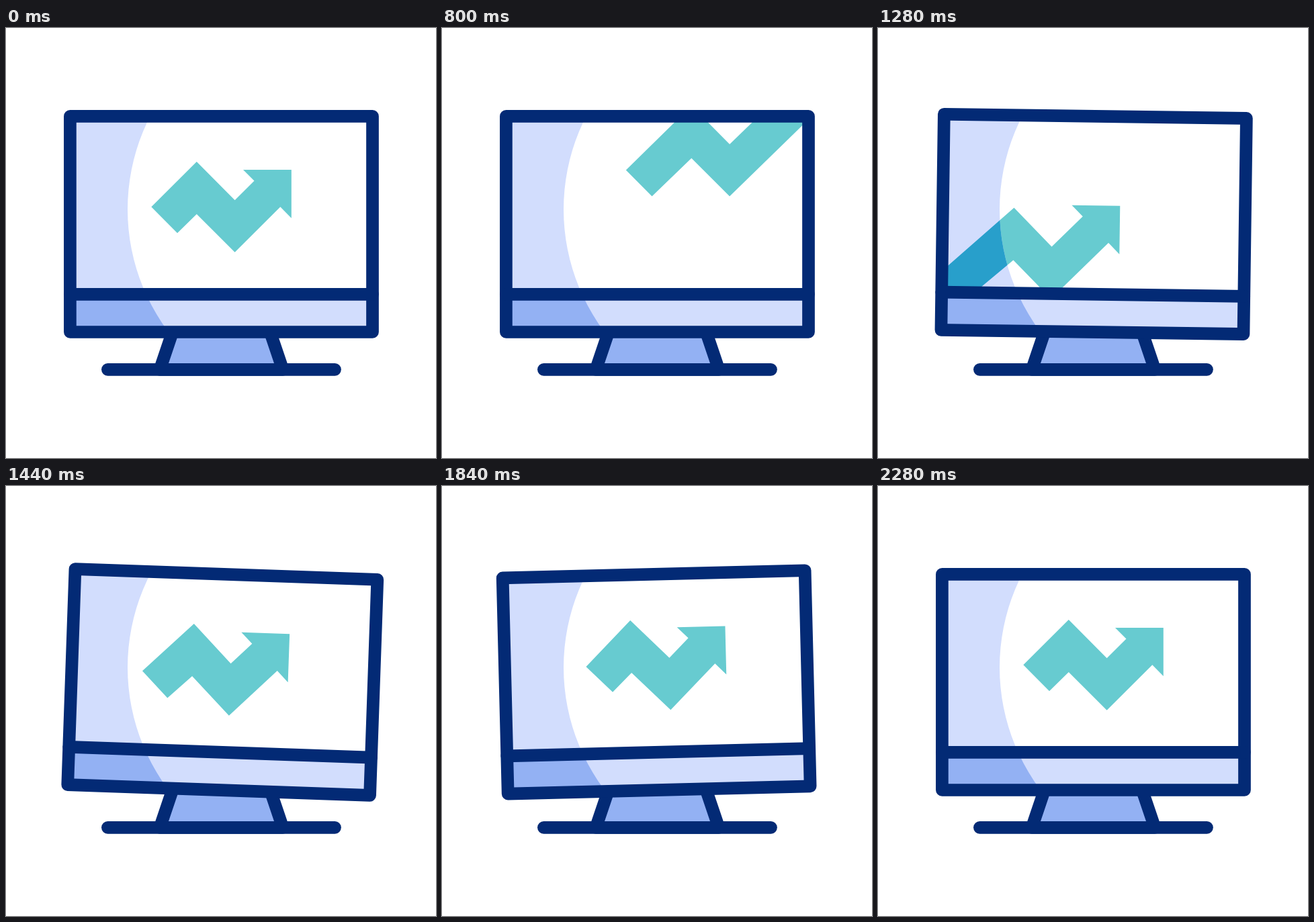
Animation of 640 by 640 pixels, one loop 2480 ms. Source, as an HTML page with a canvas:

```html
<!DOCTYPE html>
<html lang="en">
<head>
<meta charset="utf-8">
<title>Growth monitor</title>
<style>
  html, body { margin: 0; width: 100%; height: 100%; overflow: hidden; background: #fff; }
  canvas { display: block; width: 100vw; height: 100vh; }
</style>
</head>
<body>
<canvas id="stage" width="640" height="640"></canvas>
<script>
const ctx = document.getElementById('stage').getContext('2d');
const NAVY = '#032a75', LIGHT = '#d2ddfd', MID = '#93b1f3', TEAL = '#67cbd0', BLUE = '#289fcb';
const LOOP = 2480, STEP = 40, LAST = 2280;
const PIVOT = [320, 344], LINE = 18.7;
const WRAP = 960; // the arrow has left at the top and comes back from below

const clamp = v => Math.min(1, Math.max(0, v));
const ease = p => p * p * (3 - 2 * p);
const between = (t, a, b) => clamp((t - a) / (b - a));

// Screen swing: [time, degrees]
const SWING = [[1160, 0], [1440, 2], [1720, -3], [2000, 1], [2280, 0]];

function swing(t) {
  for (let i = 1; i < SWING.length; i++) {
    const [t0, a] = SWING[i - 1], [t1, b] = SWING[i];
    if (t < t1) return (a + (b - a) * ease(between(t, t0, t1))) * Math.PI / 180;
  }
  return 0;
}

// Offsets of the arrow's three parts: the head leads, the tail lags
function offsets(t) {
  if (t < WRAP) {
    const pull = -17 * ease(between(t, 0, 280));
    const head = pull + 225 * ease(between(t, 280, 1040));
    const push = Math.max(0, (t - 440) / 360) ** 3;
    const up = d => [d, -d * 0.952];
    return { head: up(head), body: up(87.5 * push), tail: up(57.5 * push) };
  }
  const rest = 1 - ease(between(t, 840, 1508));
  const from = (x, y) => [-x * rest, y * rest];
  return { head: from(243, 197), body: from(305, 260), tail: from(541, 449) };
}

function arrow(t) {
  const { head, body, tail } = offsets(t);
  const move = (o, pts) => pts.map(([x, y]) => [x + o[0], y + o[1]]);
  return [
    ...move(tail, [[216.3, 266.3]]),
    ...move(body, [[283.8, 199], [340.6, 256.2]]),
    ...move(head, [[369.5, 227.5], [353, 211], [424.8, 211], [424.8, 283], [408.3, 266.3]]),
    ...move(body, [[340.6, 333.7], [283.8, 277]]),
    ...move(tail, [[255, 305.2]])
  ];
}

function trace(pts) {
  ctx.beginPath();
  pts.forEach(([x, y]) => ctx.lineTo(x, y));
}

function fillPoly(pts, color) {
  trace(pts);
  ctx.closePath();
  ctx.fillStyle = color;
  ctx.fill();
}

function line(pts) {
  trace(pts);
  ctx.stroke();
}

function rotate(angle) {
  ctx.translate(...PIVOT);
  ctx.rotate(angle);
  ctx.translate(-PIVOT[0], -PIVOT[1]);
}

function panels(top, bottom, shape, color) {
  ctx.fillStyle = top;
  ctx.fillRect(95, 131, 451, 265);
  ctx.fillStyle = bottom;
  ctx.fillRect(95, 396, 451, 57);
  ctx.save();
  ctx.beginPath();
  ctx.rect(100, 136, 441, 260);
  ctx.clip();
  fillPoly(shape, color);
  ctx.restore();
}

function stand() {
  const legs = [[248, 452], [229, 508.3], [412, 508.3], [393, 452]];
  fillPoly(legs, MID);
  line(legs);
  line([[151.4, 508.3], [489.5, 508.3]]);
}

function monitor(t) {
  const angle = swing(t), shape = arrow(t);
  ctx.save();
  rotate(angle);
  panels('#fff', LIGHT, shape, TEAL);

  // The shade's curved edge stays still while the screen swings
  ctx.save();
  rotate(-angle);
  ctx.beginPath();
  ctx.rect(0, 0, 640, 640);
  ctx.moveTo(789, 270);
  ctx.arc(485, 270, 304, 0, Math.PI * 2);
  ctx.clip('evenodd');
  rotate(angle);
  ctx.beginPath();
  ctx.rect(95, 131, 225, 322);
  ctx.clip();
  panels(LIGHT, MID, shape, BLUE);
  ctx.restore();

  ctx.beginPath();
  ctx.rect(95.4, 131.3, 450.1, 321.2);
  ctx.stroke();
  line([[95.4, 396.3], [545.5, 396.3]]);
  ctx.restore();
}

function draw(t) {
  ctx.fillStyle = '#fff';
  ctx.fillRect(0, 0, 640, 640);
  ctx.strokeStyle = NAVY;
  ctx.lineWidth = LINE;
  ctx.lineCap = ctx.lineJoin = 'round';
  stand();
  monitor(t);
}

const start = performance.now();
function tick() {
  const t = (performance.now() - start) % LOOP;
  draw(Math.min(LAST, Math.floor(t / STEP) * STEP));
  requestAnimationFrame(tick);
}
tick();
</script>
</body>
</html>
```
